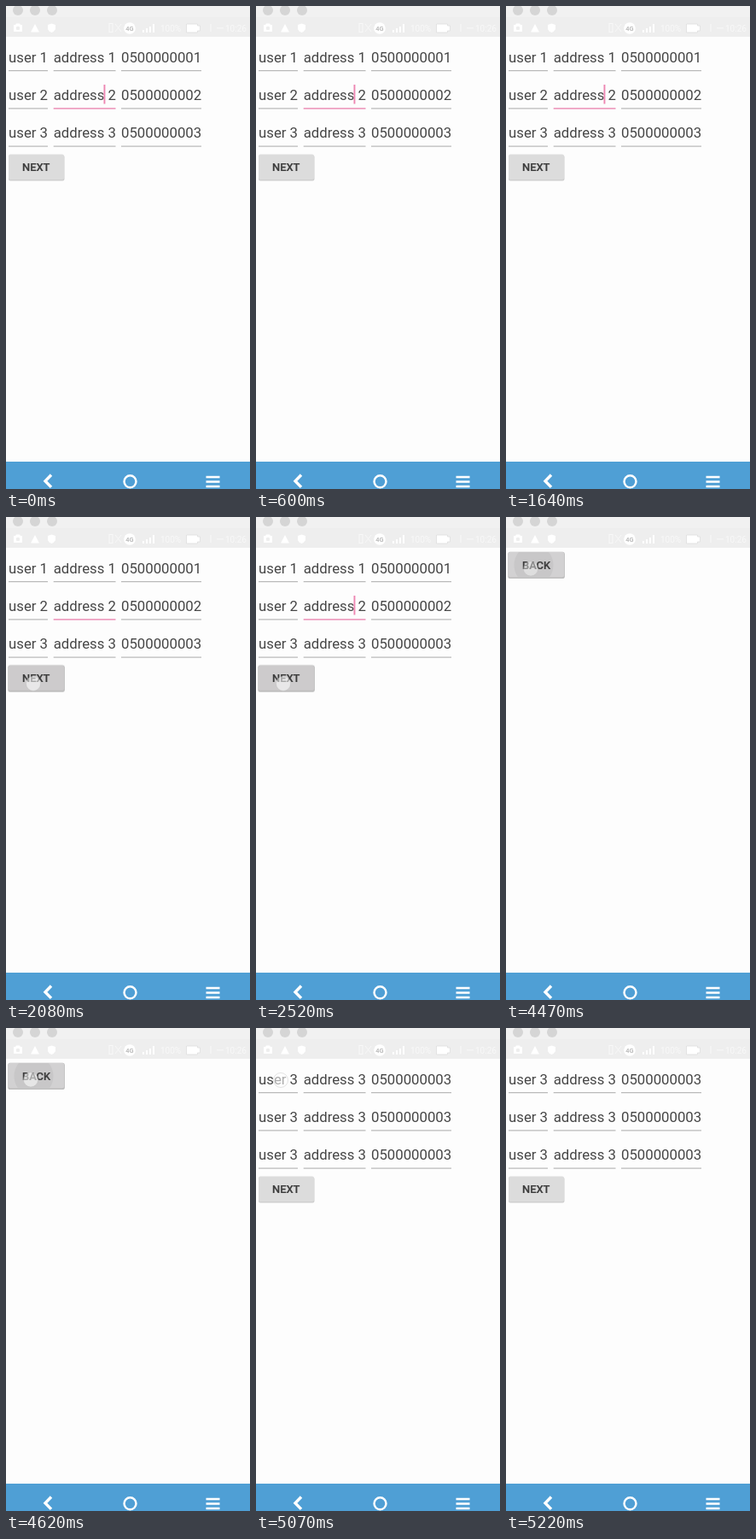
Write an HTML page that moves like this. It is 286x565 px and loops after 6770 ms.

```html
<!DOCTYPE html>
<html lang="en">
<head>
<meta charset="utf-8">
<title>Form navigation</title>
<style>
html, body { margin: 0; width: 100%; height: 100%; overflow: hidden; background: #fdfdfd; }
svg { display: block; width: 286px; height: 565px; }
text { font-family: Roboto, Arial, sans-serif; white-space: pre; }
.field { font-size: 16.75px; fill: #464646; }
.label { font-size: 12.9px; font-weight: 500; fill: #3c3c3c; stroke: #3c3c3c; stroke-width: .2; }
.line { stroke: #bababa; stroke-width: 1.3; }
.focus { stroke: #ee9fc0; stroke-width: 1.8; }
.anim { opacity: 0; animation: 6770ms step-end infinite; }
#form { animation-name: form; }
#caret { animation-name: caret; }
#nextDown { animation-name: nextDown; }
#backPage { animation-name: backPage; }
#lift { animation-name: lift; }
#backDown { animation-name: backDown; }
#backTap { animation-name: backTap; }
#result { animation-name: result; }
#fade { animation-name: fade; }
@keyframes form { 0% { opacity: 1 } 41.6543%, 100% { opacity: 0 } }
@keyframes caret {
  0%, 8.8626%, 24.2245%, 37.2230% { opacity: 1 }
  2.2156%, 15.3618%, 30.7237%, 41.6543%, 100% { opacity: 0 }
}
@keyframes nextDown { 0% { opacity: 0 } 30.7237% { opacity: 1 } 41.6543%, 100% { opacity: 0 } }
@keyframes backPage { 0% { opacity: 0 } 41.6543% { opacity: 1 } 74.8892%, 100% { opacity: 0 } }
@keyframes lift { 0% { opacity: 0 } 41.6543% { opacity: 1 } 66.0265%, 100% { opacity: 0 } }
@keyframes backDown { 0% { opacity: 0 } 66.0265% { opacity: 1 } 74.8892%, 100% { opacity: 0 } }
@keyframes backTap { 0% { opacity: 0 } 66.0265% { opacity: .75 } 68.2422% { opacity: 1 } 74.8892%, 100% { opacity: 0 } }
@keyframes result { 0% { opacity: 0 } 74.8892%, 100% { opacity: 1 } }
@keyframes fade { 0% { opacity: 0 } 74.8892% { opacity: 1 } 77.1048%, 100% { opacity: 0 } }
</style>
</head>
<body>
<svg viewBox="0 0 286 565">
  <defs>
    <g id="button">
      <rect x="3" y="1" width="65.5" height="30" rx="2" fill="#cfcfcf"/>
      <rect x="3" y="0" width="65" height="29.3" rx="2" fill="#dcdcdc"/>
    </g>
    <g id="pressed">
      <rect x="2.3" y="-.3" width="66.5" height="31.3" rx="2.5" fill="#bdbdbd"/>
      <rect x="3" y="0" width="65" height="29.3" rx="2" fill="#cdcbcc"/>
    </g>
    <circle id="touch" r="8.5" fill="#fff" fill-opacity=".55" stroke="#bbb" stroke-opacity=".5" stroke-width=".8"/>
    <circle id="ring" r="9" fill="#fff" fill-opacity=".35" stroke="#dedede" stroke-width=".8"/>
  </defs>

  <rect width="286" height="565" fill="#fdfdfd"/>
  <rect width="286" height="36" fill="#eeeeee"/>
  <rect width="286" height="13" fill="#f1f1f1"/>
  <g fill="#d5d5d5">
    <circle cx="14" cy="5" r="6"/><circle cx="34" cy="5" r="6"/><circle cx="54" cy="5" r="6"/>
  </g>

  <g fill="#fff">
    <path d="M9 22h2l1-1.5h4l1 1.5h2v8H9z"/>
    <circle cx="14" cy="26" r="2.3" fill="#eee"/>
    <path d="M34 21l5 9.5H29z"/>
    <path d="M49 22l4.5-1.5L58 22v5q-1.5 3-4.5 4Q50 30 49 27z"/>
    <circle cx="145" cy="26" r="6.8"/>
    <path d="M160 31v-3h2v3zm4 0v-5h2v5zm4 0v-7h2v7zm4 0V21h2v10z"/>
  </g>
  <g fill="none" stroke="#f8f8f8">
    <rect x="121" y="20.5" width="4" height="10"/>
    <path d="M128 21l7 9m0-9l-7 9M240 21v9M247 26h8"/>
  </g>
  <path d="M211.5 21h13v2h3v6h-3v2h-13z" fill="#fff" stroke="#ddd" stroke-width=".8"/>
  <text x="145" y="28.6" font-size="7.5" font-weight="500" text-anchor="middle" fill="#b3b3b3">4G</text>
  <g font-size="10" fill="#f8f8f8"><text x="181" y="30">100%</text><text x="257" y="30">10:26</text></g>

  <g id="form" class="anim">
    <g id="entries"></g>
    <rect id="caret" class="anim" x="114.5" y="92" width="1.9" height="22.5" fill="#ee86b2"/>
    <use href="#button" y="173.6"/>
    <use id="nextDown" class="anim" href="#pressed" y="173.6"/>
    <text class="label" x="19" y="193">NEXT</text>
    <g id="nextDown" class="anim"><use href="#touch" x="32" y="195"/></g>
  </g>

  <g id="backPage" class="anim">
    <use href="#button" y="41"/>
    <g id="backDown" class="anim">
      <use href="#pressed" y="41"/>
      <rect x="3" y="41" width="65" height="29.3" rx="2" fill="#d2d1d2"/>
      <path d="M15 41A24 24 0 0 0 14 70.3H51A24 24 0 0 0 50 41z" fill="#c8c7c8"/>
    </g>
    <text class="label" x="19" y="60.5">BACK</text>
    <g id="backTap" class="anim"><use href="#touch" x="29" y="60.5"/></g>
    <g id="lift" class="anim"><use href="#ring" x="32" y="195"/></g>
  </g>

  <g id="result" class="anim">
    <g id="repeats"></g>
    <use href="#button" y="173.6"/>
    <text class="label" x="19" y="193">NEXT</text>
    <g id="fade" class="anim"><use href="#touch" x="29" y="61"/></g>
  </g>

  <rect y="533" width="286" height="32" fill="#4f9fd5"/>
  <g fill="none" stroke="#fff">
    <path d="M53 548.5l-7 7.2 7 7.2" stroke-width="3.4"/>
    <circle cx="145.5" cy="556.3" r="7" stroke-width="2.4"/>
    <path d="M234.5 551h16M234.5 556.5h16M234.5 562h16" stroke-width="2.5"/>
  </g>
</svg>
<script>
const columns = [[3, 49], [55.7, 128.5], [135, 229]];

function rows(id, numbers, focusRow) {
  document.getElementById(id).innerHTML = numbers.map((n, row) => {
    const y = 65.6 + row * 44.2;
    const words = [`user ${n}`, `address ${n}`, `050000000${n}`];
    return columns.map(([left, right], col) => {
      const style = row === focusRow && col === 1 ? 'focus' : 'line';
      return `<text class="field" x="${left}" y="${y}">${words[col]}</text>
        <path class="${style}" d="M${left} ${y + 10.1}H${right}"/>`;
    }).join('');
  }).join('');
}

rows('entries', [1, 2, 3], 1);
rows('repeats', [3, 3, 3], -1);
</script>
</body>
</html>
```
